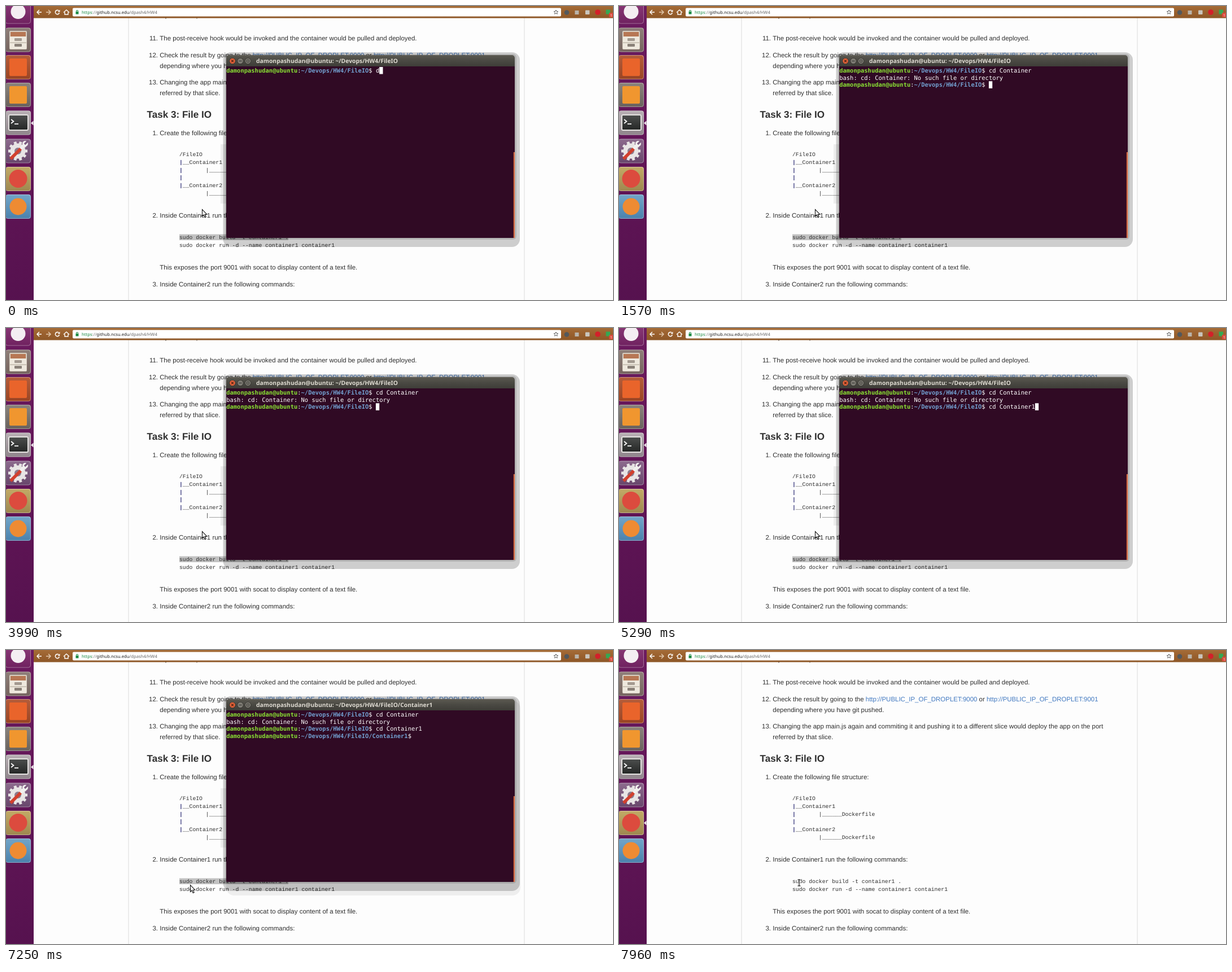
Write an HTML page with a canvas that moves like this. It is 1075 px wide and 521 px high and loops after 8000 ms.

```html
<!DOCTYPE html>
<html lang="en">
<head>
<meta charset="utf-8">
<title>Terminal over a task page</title>
<style>
  html, body { margin: 0; width: 100%; height: 100%; overflow: hidden; background: #fdfdfd; }
  canvas { display: block; }
</style>
</head>
<body>
<canvas id="stage" width="1075" height="521"></canvas>
<script>
const ctx = document.getElementById('stage').getContext('2d');
const LOOP = 8000;
const BODY = '11.47px "Liberation Sans", sans-serif';
const CODE = '9.75px "Liberation Mono", monospace';
const TERM = '10.48px "DejaVu Sans Mono", monospace';
const UI = '"Noto Sans", sans-serif';
const INK = '#2f2f2f', LINK = '#4078c0';
const USER = 'damonpashudan@ubuntu', HOME = '~/Devops/HW4/FileIO';

// Each list holds [start time, value] pairs.
const firstCommand = [[0, 'd'], [130, ''], [260, 'c'], [400, 'cd'], [550, 'cd '],
  [830, 'cd C'], [1110, 'cd Con'], [1260, 'cd Container']];
const secondCommand = [[0, ''], [4550, 'cd Container'], [5290, 'cd Container1']];
const pointer = [[0, ['arrow', 347, 360]], [6290, ['arrow', 299, 352]], [6410, ['arrow', 313, 357]],
  [6550, ['arrow', 311, 435]], [6680, ['arrow', 317, 431]], [6960, ['beam', 322, 427]],
  [7110, ['beam', 326, 420]], [7250, ['arrow', 326, 416]], [7810, ['beam', 320, 412.5]],
  [7960, ['beam', 319, 412.5]]];
const cursorToggles = [2130, 2690, 3270, 3990, 5170, 5290, 6160, 6680, 7250];
const valueAt = (steps, t) => steps.filter(([start]) => start <= t).pop()[1];

function rect(x, y, w, h, fill, radius = 0) {
  ctx.fillStyle = fill;
  ctx.beginPath();
  ctx.roundRect(x, y, w, h, radius);
  ctx.fill();
}

function disc(x, y, r, fill) {
  ctx.fillStyle = fill;
  ctx.beginPath();
  ctx.arc(x, y, r, 0, 2 * Math.PI);
  ctx.fill();
}

function line(points, stroke, width = 1, closed = false) {
  ctx.strokeStyle = stroke;
  ctx.lineWidth = width;
  ctx.beginPath();
  points.forEach(([x, y]) => ctx.lineTo(x, y));
  if (closed) ctx.closePath();
  ctx.stroke();
}

function polygon(points, fill) {
  ctx.fillStyle = fill;
  ctx.beginPath();
  points.forEach(([x, y]) => ctx.lineTo(x, y));
  ctx.fill();
}

function text(str, x, y, font, fill = INK, align = 'left') {
  ctx.font = font;
  ctx.fillStyle = fill;
  ctx.textAlign = align;
  ctx.fillText(str, x, y);
  return x + ctx.measureText(str).width;
}

function vertical(y0, y1, ...colors) {
  const g = ctx.createLinearGradient(0, y0, 0, y1);
  colors.forEach((c, i) => g.addColorStop(i / (colors.length - 1), c));
  return g;
}

function item(number, str, y) {
  text(number + '.', 269, y, BODY, INK, 'right');
  return text(str, 272.3, y, BODY);
}

function drawPage(t) {
  rect(49, 21, 1026, 500, '#fdfdfd');
  rect(216.5, 21, 1, 500, '#dcdcdc');
  rect(917.5, 21, 1, 500, '#dcdcdc');
  rect(282, 21, 2, 1.5, '#777');
  rect(337, 21, 2, 1.5, '#999');

  item(11, 'The post-receive hook would be invoked and the container would be pulled and deployed.', 61.3);
  let x = item(12, 'Check the result by going to the ', 91.2);
  x = text('http://PUBLIC_IP_OF_DROPLET:9000', x, 91.2, BODY, LINK);
  x = text(' or ', x, 91.2, BODY);
  text('http://PUBLIC_IP_OF_DROPLET:9001', x, 91.2, BODY, LINK);
  text('depending where you have git pushed.', 272.3, 109.5, BODY);
  item(13, 'Changing the app main.js again and commiting it and pushing it to a different slice would deploy the app on the port', 139.3);
  text('referred by that slice.', 272.3, 157.6, BODY);

  text('Task 3: File IO', 249.5, 198, 'bold 17.1px "Liberation Sans", sans-serif');
  item(1, 'Create the following file structure:', 228.6);
  ['/FileIO', '|__Container1', '|       |______Dockerfile', '|', '|__Container2', '        |______Dockerfile']
    .forEach((row, i) => {
      const y = 266 + i * 13.75;
      text(row, 307, y, CODE);
      if (row[0] === '|') text('|', 307, y, CODE, '#3030a0');
    });

  item(2, 'Inside Container1 run the following commands:', 375.4);
  if (t < 7660) rect(307, 404.5, 193, 10.5, '#c2c2c2');
  text('sudo docker build -t container1 .', 307, 412.8, CODE);
  text('sudo docker run -d --name container1 container1', 307, 426.6, CODE);
  text('This exposes the port 9001 with socat to display content of a text file.', 272.3, 467, BODY);
  item(3, 'Inside Container2 run the following commands:', 496.9);
}

function drawToolbar() {
  rect(49, 0, 1026, 21.5, vertical(0, 22, '#a56c37', '#99602e', '#8d5727'));
  rect(118, 3.5, 865, 15, '#fff', 2);
  const arrow = (x, dir, color) => {
    line([[x - 4 * dir, 11], [x + 4 * dir, 11]], color, 1.5);
    line([[x, 7], [x + 4 * dir, 11], [x, 15]], color, 1.5);
  };
  arrow(59, -1, '#fff');
  arrow(75, 1, '#e2c9ad');
  ctx.beginPath();
  ctx.arc(91, 11, 3.6, 0.3, 5.4);
  ctx.strokeStyle = '#fff';
  ctx.lineWidth = 1.6;
  ctx.stroke();
  polygon([[91.5, 10.5], [95.5, 10.5], [95.5, 6.5]], '#fff');
  line([[102, 11.5], [107, 7], [112, 11.5]], '#fff', 1.4);
  line([[104, 11], [104, 15], [110, 15], [110, 11]], '#fff', 1.4);

  rect(123.5, 10, 5, 4.5, '#1b8a43');
  line([[124.6, 10], [124.6, 7.8], [127.4, 7.8], [127.4, 10]], '#1b8a43');
  const font = '7.65px ' + UI;
  let x = text('https', 134, 13.7, font, '#1b8a43');
  x = text('://', x, 13.7, font, '#777');
  x = text('github.ncsu.edu', x, 13.7, font, '#222');
  text('/dpash4/HW4', x, 13.7, font, '#666');

  const star = Array.from({ length: 10 }, (_, i) => {
    const r = i % 2 ? 1.8 : 4, a = i * Math.PI / 5;
    return [974 + r * Math.sin(a), 11 - r * Math.cos(a)];
  });
  line(star, '#555', 0.9, true);
  disc(993, 11.5, 4.3, '#53585c');
  rect(1007.5, 8, 7, 7, '#b9b3aa');
  rect(1026, 7.5, 7.5, 7.5, '#c9c5bd', 1);
  disc(1048, 11, 4.8, '#d3202a');
  rect(1062.5, 6.5, 7.5, 8, '#35a853');
  rect(1068, 12, 7, 8, '#d94a3c', 1);
  text('1', 1070, 18.6, '6.5px ' + UI, '#fff');
}

function tile(y, top, bottom) {
  rect(0, y - 21.5, 44, 43, vertical(y - 21, y + 21, top, bottom), 4);
  ctx.strokeStyle = 'rgba(255,255,255,.35)';
  ctx.lineWidth = 1;
  ctx.beginPath();
  ctx.roundRect(-1, y - 21, 44.5, 42, 4);
  ctx.stroke();
}

function drawLauncher(t) {
  rect(0, 0, 49, 521, vertical(0, 521, '#6c1b5f', '#621557', '#56124f'));
  tile(10, '#8d3c79', '#702260');
  disc(21.5, 10, 13, '#f4eef2');

  tile(60, '#8f7f79', '#75645e');
  rect(6, 44, 31, 33, '#d8cfc2', 2);
  rect(8, 46, 27, 8, '#b77754');
  rect(7, 54, 29, 22, '#eee8dd', 1);
  rect(7, 64.5, 29, 1, '#a79c8e');
  rect(15, 57, 13, 5, '#a39a90', 1);
  rect(15, 67, 13, 5, '#8a8178', 1);

  tile(108.5, '#b45c3a', '#9a4524');
  rect(6, 93, 31, 31, '#e9642b', 2);
  tile(157.5, '#8a837c', '#69625d');
  rect(6, 142, 31, 31, '#f0962f', 2);

  tile(207, '#b9b1b5', '#8f858b');
  rect(4, 192, 36, 29, '#e4e2e0', 3);
  rect(6, 194, 32, 25, vertical(194, 219, '#4b4d4c', '#262827'), 1);
  line([[9, 201], [13.5, 204.5], [9, 208]], '#fff', 1.7);
  line([[15, 209], [22, 209]], '#fff', 1.7);

  tile(257, '#8c6a8d', '#68476c');
  for (let i = 0; i < 10; i++) {
    const a = i * Math.PI / 5, c = Math.cos(a), s = Math.sin(a);
    line([[21 + 8 * c, 257 + 8 * s], [21 + 17 * c, 257 + 17 * s]], '#e8e5e5', 5);
  }
  disc(21, 257, 13.5, '#e8e5e5');
  disc(21, 257, 6, '#8c7b8c');
  line([[8, 271], [27, 252]], '#d2402e', 5.5);
  line([[26, 253], [34, 245]], '#f2f0ef', 6);
  disc(34, 244, 5, '#f2f0ef');
  line([[33, 245], [39, 239]], '#7d5c80', 3.5);

  tile(306.5, '#c2aa66', '#9e8850');
  disc(21.5, 306, 16, '#dc4b3e');
  tile(355.5, '#72a5c8', '#4b82ad');
  disc(21.5, 355.5, 15, '#ee8b33');

  const y = t < 7530 ? 207.5 : 306.5;
  polygon([[44, y], [48.5, y - 4], [48.5, y + 4]], '#eee6ec');
}

function prompt(path, y) {
  let x = text(USER, 390.2, y, 'bold ' + TERM, '#8ae234');
  x = text(':', x, y, TERM, '#fff');
  x = text(path, x, y, 'bold ' + TERM, '#729fcf');
  return text('$ ', x, y, TERM, '#fff');
}

function drawTerminal(t) {
  const entered = t >= 5570;
  const inner = HOME + '/Container1';
  rect(380, 245, 10, 105, 'rgba(0,0,0,.06)');
  if (t >= 7250) rect(390, 90, 521, 345, 'rgba(0,0,0,.06)', 14);
  rect(384.5, 82, 525.5, 345, 'rgba(0,0,0,.19)', 14);
  rect(388, 85, 516, 329, 'rgba(0,0,0,.12)', 6);

  rect(390, 87, 511, 21, vertical(87, 107, '#5c5a52', '#4a4943', '#3e3d38'), [5, 5, 0, 0]);
  disc(401, 97.5, 5.5, '#33322e');
  disc(401, 97.5, 4.8, '#e4633a');
  line([[399, 95.5], [403, 99.5]], '#5a2413', 1.2);
  line([[403, 95.5], [399, 99.5]], '#5a2413', 1.2);
  for (const x of [415, 428.5]) {
    disc(x, 97.5, 5.5, '#33322e');
    disc(x, 97.5, 4.8, '#7d7b73');
  }
  line([[412.5, 97.5], [417.5, 97.5]], '#3b3a36', 1.2);
  line([[426.5, 95.5], [430.5, 95.5], [430.5, 99.5], [426.5, 99.5]], '#3b3a36', 1, true);
  text(`${USER}: ${entered ? inner : HOME}`, 443, 101.3, 'bold 10.35px ' + UI, '#dfdbd2');

  rect(390, 107, 511, 304, '#300a24');
  rect(898.8, 259, 2.2, 152, '#d9683f');

  let y = 118, x = text(valueAt(firstCommand, t), prompt(HOME, y), y, TERM, '#fff');
  if (t >= 1570) {
    text('bash: cd: Container: No such file or directory', 390.2, 130.7, TERM, '#fff');
    y = 143.3;
    x = text(valueAt(secondCommand, t), prompt(HOME, y), y, TERM, '#fff');
  }
  if (entered) x = prompt(inner, y = 156);
  if (cursorToggles.filter(time => time <= t).length % 2 === 0) rect(x, y - 10, 6.3, 12.6, '#fff');
}

function drawPointer(t) {
  const [kind, px, py] = valueAt(pointer, t);
  ctx.save();
  ctx.translate(px, py);
  if (kind === 'arrow') {
    const shape = [[0.5, 0.5], [0.5, 12.5], [3.2, 10], [5.2, 14.5], [7.2, 13.6], [5.3, 9.2], [8.8, 9.2]];
    polygon(shape, '#fff');
    line(shape, '#111', 1.1, true);
  } else {
    for (const [color, width] of [['#fff', 3], ['#222', 1.3]]) {
      line([[-2.5, -5.5], [2.5, -5.5]], color, width);
      line([[0, -5.5], [0, 5.5]], color, width);
      line([[-2.5, 5.5], [2.5, 5.5]], color, width);
    }
  }
  ctx.restore();
}

function draw() {
  const t = performance.now() % LOOP;
  ctx.textRendering = 'geometricPrecision';
  drawPage(t);
  drawToolbar();
  drawLauncher(t);
  if (t < 7380) drawTerminal(t);
  drawPointer(t);
  requestAnimationFrame(draw);
}
draw();
</script>
</body>
</html>
```
